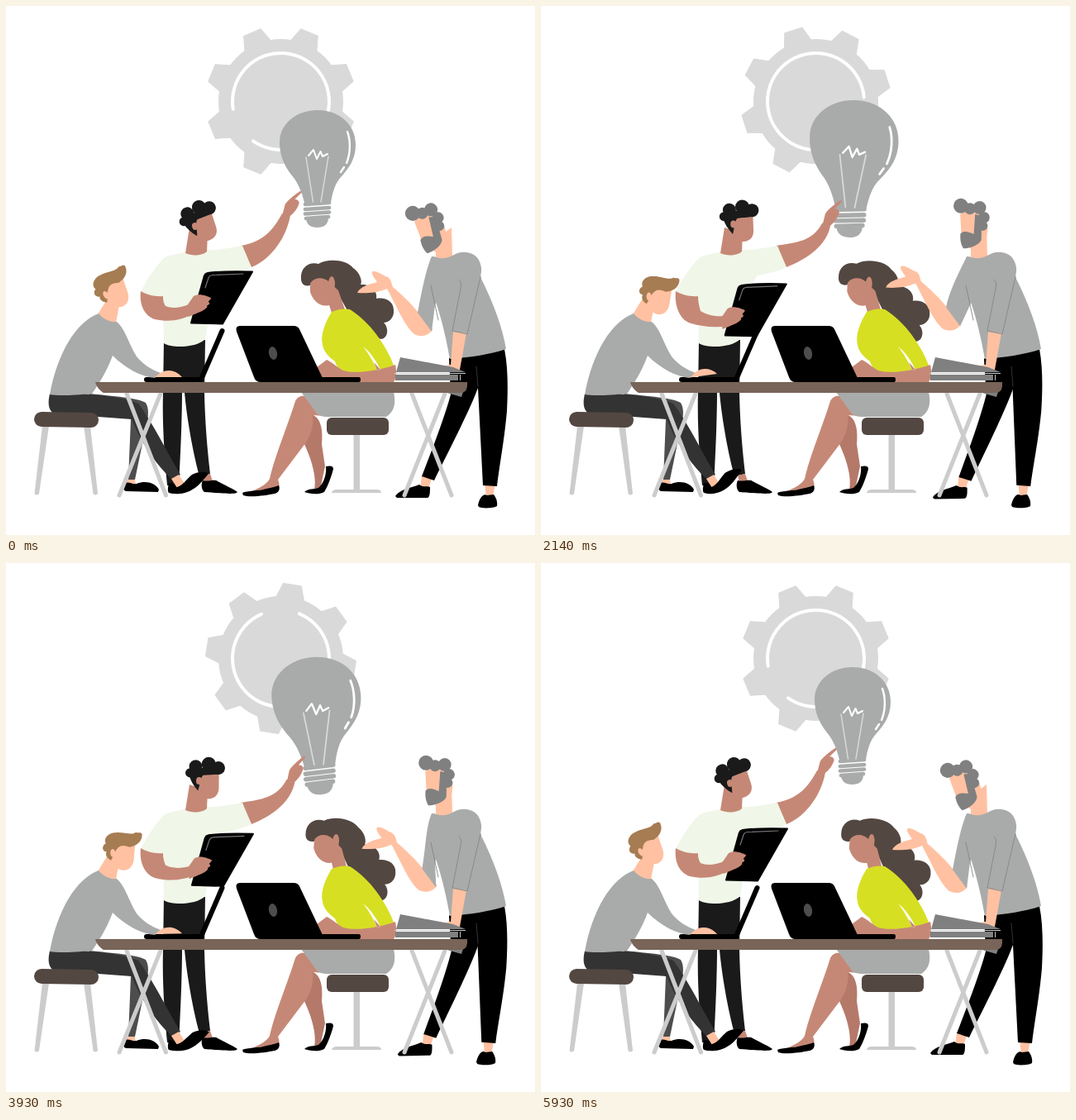
Write an HTML page that moves like this. It is 640 by 640 pixels and loops after 6000 ms.

```html
<!DOCTYPE html>
<html lang="en">
<head>
<meta charset="utf-8">
<title>Team at a desk</title>
<style>
html, body { margin: 0; height: 100%; overflow: hidden; background: #fff }
svg { display: block; width: 100vw; height: 100vh }
.skin { fill: #c68876 } .pale { fill: #ffc1a1 } .grey { fill: #a9abaa }
.mid { fill: #808080 } .brown { fill: #534741 } .ink { fill: #1a1a1a }
.line { fill: none; stroke-linecap: round; stroke-linejoin: round }
</style>
</head>
<body>
<svg viewBox="0 0 640 640">
<g id="gear" fill="#d9d9d9">
  <circle r="75.5"/>
  <path id="teeth" stroke="#d9d9d9" stroke-width="1" stroke-linejoin="round"/>
  <path id="ring" class="line" stroke="#fff" stroke-width="4"/>
</g>

<g id="bulb">
  <path class="grey" d="M377 126C403 126 423 143 423 168C423 186 414 197 406 206C398 214 395 226 393 238H361C358 225 353 213 345 204C336 192 331 180 331 165C331 143 351 126 377 126Z"/>
  <path class="grey" d="M363 257H390Q389 268 376.500 268Q364 268 363 257Z"/>
  <path class="line" stroke="#a9abaa" stroke-width="4.600" d="M362 240L391 238M362 246L391 244M362 251.500L391 249.500M363 257L390 255"/>
  <path class="line" stroke="#d9d9d9" stroke-width="1.500" d="M363 183L371.500 237M390 182L381 237"/>
  <path class="line" stroke="#fff" stroke-width="2" d="M366 181L372 174L376 185L380.500 176L383 182L389 179"/>
  <path class="line" stroke="#fff" stroke-width="2.400" d="M413 152C417 163 417 178 412 190M409 195L405 201"/>
</g>

<!-- standing presenter -->
<path class="ink" d="M191 404H241L240 468C241 510 244 540 247 566L234 569C226 540 219 500 216 468H213C213 500 211 545 209 580H195C191 540 189 500 190 468Z"/>
<path d="M197 577C196 582 195 587 197 589C203 591 209 590 214 588V579Z"/>
<path class="skin" d="M238 568L247 566L250 575L240 577Z"/>
<path d="M238 574C245 576 252 572 256 575C265 580 275 584 280 588C278 591 268 590 240 588C236 585 236 578 238 574Z"/>
<path id="reach" class="skin"/>
<path id="point" class="skin" d="M-5 2L-7 -10C-6 -17 0 -27 3 -32C5 -33.500 6 -31 5 -30L1 -20C5 -22 7 -20 8 -18C8.500 -12 8 -6 3 3Z"/>
<path fill="#f0f6e8" d="M217 298C205 300 195 302 191 305C180 316 168 335 163 346C170 350 180 352 190 351L191 408C200 414 230 414 241 403L252 340L262 326C275 324 288 320 297 316L286 290C270 293 250 296 243 295Z"/>
<path class="skin" d="M222 268L217 299C225 303 238 302 243 297L244 276Z"/>
<g id="headA">
  <path class="skin" d="M229 256L256 253L257 272C257 281 251 285 243 285C234 285 228 274 229 256Z"/>
  <g class="ink">
    <circle cx="227.500" cy="247" r="8"/><circle cx="243" cy="243" r="8.500"/><circle cx="255" cy="247" r="8"/><circle cx="221" cy="255" r="5.500"/>
    <path d="M221 248H262C260 257 246 255 237 257C233 262 234 270 232 276C226 270 222 264 220 257Z"/>
  </g>
  <ellipse class="skin" cx="232.500" cy="264" rx="3.500" ry="4.500"/>
</g>
<path id="fold" class="skin"/>

<!-- laptop seen from the side -->
<path class="line" stroke="#000" stroke-width="6" d="M170 452H236L261.500 393"/>
<g id="tablet">
  <path stroke="#000" stroke-width="2" stroke-linejoin="round" d="M244 323Q262 320.500 298 321.500L262 384.500L224 383.500L240 326Q241 323.500 244 323Z"/>
  <path class="line" stroke="#777" stroke-width="1.200" d="M241 341L245 329Q246 326 250 325.500L287 324"/>
  <path class="skin" d="M218 364L227 351C234 347 243 351 248 353C248 356 243 357 246 359C247 362 242 361.500 243.500 364C240 369 232 371 221 376Z"/>
</g>

<!-- seated typist -->
<path fill="#ccc" d="M44 508H52L40 590Q37 593 34.500 590ZM94 508H102L111 590Q108 593 105.500 590Z"/>
<path fill="#4d4d4d" d="M100 469C130 472 160 474 169 480C174 488 172 500 168 515L156 573H148L151 500Z"/>
<path fill="#333" d="M53 469H92C125 471 150 476 160 481C175 500 195 540 211 567L201 573C183 556 165 532 152 500L58 493C50 488 51 478 53 469Z"/>
<path class="pale" d="M146 573H156L157 580H145ZM200 572L209 567L216 578L207 583Z"/>
<path d="M143 577C150 575 152 579 158 578C168 574 180 576 185 585L184 588L145 587C141 585 141 581 143 577Z"/>
<path id="shoe" d="M207 582C214 580 218 573 225 567C233 563 242 563 245 566C238 574 228 589 210 590C200 591 196 588 200 584Z"/>
<rect class="brown" x="34" y="491.500" width="78" height="18" rx="9" transform="rotate(1 73 500)"/>
<path class="pale" d="M124 352L111 373C116 381 126 385 133 383L137 362Z"/>
<path class="grey" d="M112 372C85 382 62 420 53 470C65 472 80 471 104 469C112 458 122 442 129 423C145 439 165 449 180 450L187 444C176 440 165 433 158 424C148 408 144 390 134 382C126 383 118 379 112 372Z"/>
<path id="type" class="pale" d="M180 449L188 443C197 439 206 441 213 449Z"/>
<g id="headB">
  <path class="pale" d="M122 340L150 334L152 354C152 362 148 368 140 368C131 368 126 362 123 354Z"/>
  <path fill="#a67c52" d="M156 321C158 330 152 336 144 339C138 338 133 338 130 343C127 348 127 354 125 359C120 358 116 353 118 350C111 350 111 343 115 340C110 334 117 326 124 325C132 322 145 325 148 320C151 321 154 317.500 156 321Z"/>
  <ellipse class="pale" cx="125.500" cy="350" rx="3" ry="5" transform="rotate(-15 125 350)"/>
</g>

<!-- woman -->
<path fill="#b5796a" d="M366 494C379 494 384 508 382 530L386 557L380 585H373C376 570 370 550 361 530Z"/>
<path class="skin" d="M350 478C354 471 362 468 372 480L386 496L371 495C373 508 368 522 360 532L329 573C331 578 331 582 329 583L297 587C308 583 316 578 319 572C325 545 340 510 350 478Z"/>
<path d="M286 589C292 586 305 587 315 584C322 583 327 581 330 580C332 584 330 589 325 590C315 592 295 595 287 592ZM387 557C392 556 396 556 396 560C394 568 390 580 385 588C378 592 366 590 361 588C366 583 373 585 378 583C385 577 388 565 387 557Z"/>
<path class="grey" d="M357 467L376 493Q380 497 388 497H460C470 491 472 480 469 467Z"/>
<path fill="#ccc" d="M420.500 518H428V585H448Q454 585 454 589H394Q395 585 400 585H420.500Z"/>
<rect class="brown" x="388" y="498" width="75" height="21" rx="6"/>
<g id="headC">
  <path class="brown" d="M357 330C356 317 366 309 378 312C390 305 412 307 420 317C430 324 431 335 429 337C440 336 450 344 448 354C460 352 469 358 469 368C470 377 463 383 457 383C464 390 462 403 453 403C445 398 430 385 415 372L400 345C395 335 380 329 368 338C360 340 357 335 357 330Z"/>
  <path class="skin" d="M368 336C372 328 384 327 391 334L402 344L411 370L395 374L391 362C380 365 371 356 368 346Z"/>
  <ellipse class="skin" cx="394" cy="336" rx="4" ry="9"/>
</g>
<path fill="#d7df23" d="M394 370C403 366 411 366 416 367C440 382 460 410 470 437L448 443C425 447 402 446 398 430C391 425 384 418 383 410C380 398 386 383 394 370Z"/>
<path class="skin" d="M471 434C473 442 472 452 469 455H382L376 437L388 428C396 432 402 438 408 441C425 446 455 440 471 434Z"/>
<path fill="#fff" d="M432 412C440 418 448 429 453 440L449 441C444 429 439 421 432 412Z"/>
<path class="skin" d="M445 431L453 440L449 441Z"/>
<path d="M283 387H348Q353 387 355 391L382.500 449H427Q429 449 429 452T427 455H308Q302 455 300 449L279 394Q277 387 283 387Z"/>
<ellipse cx="323" cy="420" rx="5" ry="8" fill="#4d4d4d" transform="rotate(-12 323 420)"/>

<!-- standing man at the right -->
<g id="legL">
  <path class="pale" d="M503 568L515 572L511 584H501Z"/>
  <path d="M536 426L576 420L571 462C560 492 532 545 518 574L503 569C514 540 530 500 538 470Z"/>
  <path d="M471 593C476 585 490 583 500 579C505 583 510 580 513 582C513 588 513 594 510 595H473Z"/>
</g>
<g id="legR">
  <path class="pale" d="M579 578H592L589 593H581Z"/>
  <path d="M566 424L603 415C608 440 607 470 606 490C603 525 597 555 594 581L577 580L571 462Z"/>
  <path d="M571 604C573 594 578 589 582 592L590 591C593 595 595 600 594 605C590 608 575 608 572 606Z"/>
</g>
<path class="line" stroke="#333" d="M569 436L571 460"/>
<path class="pale" d="M520 282V303C525 309 535 308 540 303L539 268Z"/>
<g id="arm" class="pale">
  <path d="M425 347C428 340 438 337 449 334C445 328 441 323 444 321C449 320 456 326 462 328C467 332 466 336 468 340C478 348 492 362 499 371L516 391C512 399 502 401 494 397C482 387 472 362 461 342C450 347 435 348 425 347Z"/>
</g>
<path class="grey" d="M515 303C521 302 526 309 540 302C552 294 570 297 574 312C577 322 573 324 575 330C590 360 601 390 605 415C585 422 560 425 537 427C533 405 526 370 513 340Z"/>
<path id="sleeve" class="grey"/>
<path class="pale" d="M541 394L557 396L549 440H529C526 436 534 434 538 434Z"/>
<path class="line" stroke="#858585" stroke-width=".9" d="M514 338L523 380M548 331Q552 334 550 342L540 393L558 397L574 328"/>
<g id="headD">
  <path class="pale" d="M508 252C512 247 520 245 527 247L541 270L536 300L521 295L509 277Z"/>
  <g class="mid">
    <circle cx="509" cy="241.500" r="9"/><circle cx="520" cy="245" r="7"/><circle cx="531.500" cy="244" r="8"/><circle cx="536.500" cy="256" r="7"/><circle cx="535" cy="266" r="6"/>
    <path d="M508 275C512 271 518 273 524 276L526 252L534 254L533 283C530 290 518 293 511 293C508 288 507 281 508 275Z"/>
  </g>
</g>

<!-- desk and folders -->
<path class="mid" d="M477 425L541 437L556 443H472ZM471 446H548V453H471ZM530 467H553L551 473Z"/>
<path d="M547 444H557V456H540L547 453Z"/>
<path stroke="#ccc" d="M470 444.500H556M549.500 446V453"/>
<path class="line" stroke="#ccc" stroke-width="5" d="M146 469L193.500 592M187 469L137 592M491 469L539 592M531 469L482 592"/>
<path fill="#786458" d="M108 455H558V460Q557 468 550 468H118C114 466 109 460 108 455Z"/>
</svg>
<script>
const $ = id => document.getElementById(id);
const LOOP = 5.93;
const KEYS = [0, .86, 1.57, 2.71, 3.43, 4.43];

const polar = (r, deg) => {
  const a = deg * Math.PI / 180;
  return (r * Math.cos(a)).toFixed(2) + ' ' + (r * Math.sin(a)).toFixed(2);
};
let teeth = '';
for (let i = 0; i < 8; i++) {
  const a = 45 * i - 67.5;
  teeth += `M${polar(74, a - 13.5)}L${polar(91, a - 7)}L${polar(91, a + 7)}L${polar(74, a + 13.5)}Z`;
}
$('teeth').setAttribute('d', teeth);
$('ring').setAttribute('d', `M${polar(58.5, 171)}A58.5 58.5 0 1 1 ${polar(58.5, 125)}`);

// Smooth periodic curve through one value per key time
function track(t, ...v) {
  const val = i => v[(i + 6) % 6];
  const time = i => KEYS[(i + 6) % 6] + LOOP * Math.floor(i / 6);
  const slope = i => (val(i + 1) - val(i - 1)) / (time(i + 1) - time(i - 1));
  let i = 0;
  while (i < 5 && t >= KEYS[i + 1]) i++;
  const h = time(i + 1) - time(i), u = (t - time(i)) / h, w = 1 - u;
  return val(i) * (1 + 2 * u) * w * w + val(i + 1) * u * u * (3 - 2 * u)
    + h * u * w * (slope(i) * w - slope(i + 1) * u);
}

const move = (id, value) => $(id).setAttribute('transform', value);
const spin = (id, deg, x, y) => move(id, `rotate(${deg} ${x} ${y})`);
const shape = (id, d) => $(id).setAttribute('d', d);

function draw(now) {
  const t = Math.min(now % 6000 / 1000, LOOP);
  const k = (...v) => track(t, ...v);

  move('gear', `translate(332.5 115.5) rotate(${-360 * t / LOOP})`);
  const size = k(1, 1.06, 1.12, 1.211, 1.213, 1.125);
  move('bulb', `translate(376.5 197) rotate(${k(0, 2.5, 4.3, .8, -.8, -4)}) scale(${size}) translate(-376.5 -197)`);

  spin('headA', k(-15, -4, 0, 1, 2, 3), 240, 280);
  spin('headB', k(-13, 0, 9, 19, 15, 6), 122, 370);
  spin('headC', 5 * Math.min(1, t / 4.4), 385, 400);
  spin('headD', k(-18, -10, -3, 0, 0, -3), 530, 300);
  spin('type', k(0, -6, -11, -4, -3, 0), 184, 447);
  spin('shoe', k(0, -4, -9, -3, 1, 3), 205, 584);
  spin('legL', k(0, -.3, -.8, -1.1, -1.1, -.7), 560, 430);
  spin('legR', k(0, .2, .5, .7, .7, .5), 590, 420);

  const x = k(340, 342, 345, 347, 346, 345), y = k(252, 256, 260, 266, 264, 261);
  move('point', `translate(${x} ${y}) rotate(${k(24, 0, 4, 42, 38, 8)})`);
  shape('reach', `M284 290C308 286 ${x - 18} ${y + 22} ${x - 6} ${y - 1}L${x + 4} ${y + 1}C${x} ${y + 26} 322 306 297 316Z`);

  const dy = k(0, 6.5, 12, 16, 10, 3.5);
  move('tablet', `translate(${k(0, -.7, -1, -1.3, 0, 1.5)} ${dy})`);
  shape('fold', `M163 345C161 362 168 ${375 + dy * .3} 180 ${379 + dy * .3}C198 ${383 + dy * .4} 212 ${380 + dy * .6} 228 ${372 + dy}L224 ${360 + dy}C210 ${366 + dy * .7} 200 ${366 + dy * .5} 193 ${363 + dy * .4}C190 358 190 354 190 351C180 352 170 349 163 345Z`);

  const ax = k(0, -5, -10, -4, 3, 6), ay = k(0, -4, -7, -5, -2, -1);
  move('arm', `translate(${ax} ${ay})`);
  shape('sleeve', `M515 303C508 318 ${502 + ax} ${350 + ay} ${498 + ax} ${371 + ay}L${515 + ax} ${394 + ay}L519 362L532 330Z`);

  requestAnimationFrame(draw);
}
requestAnimationFrame(draw);
</script>
</body>
</html>
```
